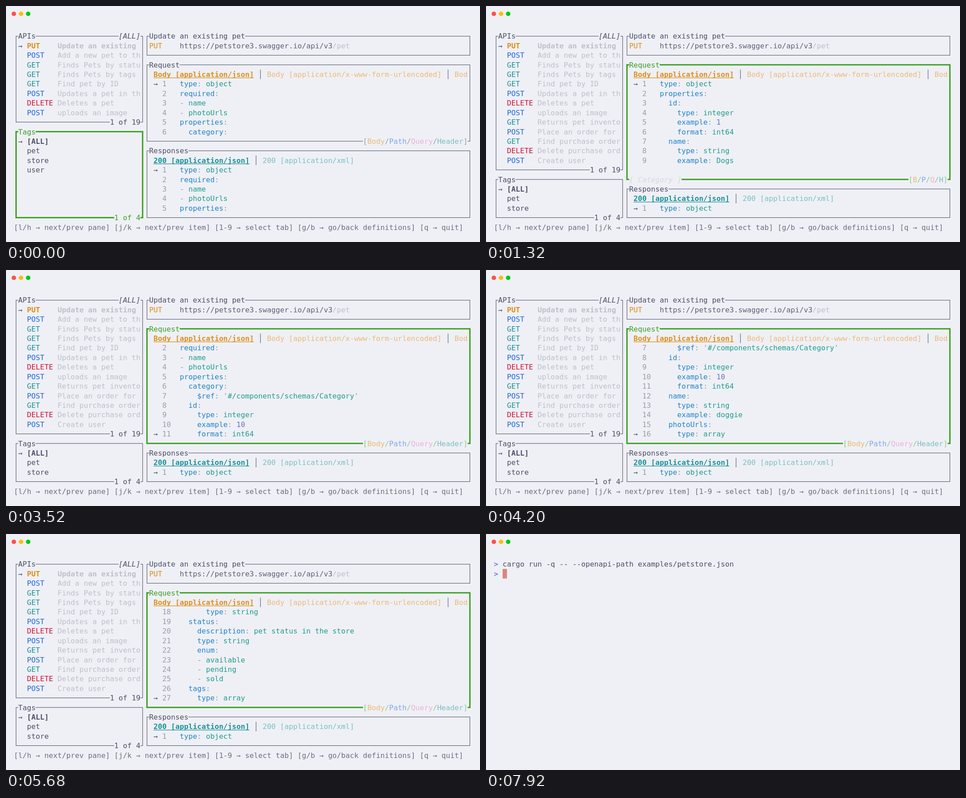
Recreate the animation shown at these times as an HTML page with a canvas. Size 1058x529 px, loop 7960 ms.

```html
<!DOCTYPE html>
<html lang="en">
<head>
<meta charset="utf-8">
<title>OpenAPI terminal browser</title>
<style>
  html, body { margin: 0; width: 100%; height: 100%; overflow: hidden; background: #eff0f5; }
  canvas { display: block; }
</style>
</head>
<body>
<canvas id="stage" width="1058" height="529"></canvas>
<script>
const ctx = document.getElementById('stage').getContext('2d');
const LOOP = 7960;
const CELL_W = 9.74, CELL_H = 21.41, LEFT = 17.6, TOP = 56.9;

const BG = '#eff0f5', DARK = '#4c4f69', BODY = '#5c5f77', MUTED = '#6c6f85', GREY = '#9a9cae',
  PALE = '#bcc0cc', FAINT = '#d6d8e0', GREEN = '#3aa024', LIGHT_GREEN = '#8cc97f',
  YELLOW = '#df8e1d', TEAL = '#179299', LIGHT_YELLOW = '#ebba78', LIGHT_TEAL = '#7ac0c4',
  KEY = '#2083cb', VALUE = '#209d90', NUMBER = '#6c6fc4', PUNCT = '#8c98a2';
const METHOD = { PUT: YELLOW, POST: '#1e66e0', GET: TEAL, DELETE: '#cf1039' };

const apis = [
  'PUT Update an existing pet', 'POST Add a new pet to the store', 'GET Finds Pets by status',
  'GET Finds Pets by tags', 'GET Find pet by ID', 'POST Updates a pet in the store',
  'DELETE Deletes a pet', 'POST uploads an image', 'GET Returns pet inventories',
  'POST Place an order for a pet', 'GET Find purchase order by ID',
  'DELETE Delete purchase order by ID', 'POST Create user'
];
const tags = ['[ALL]', 'pet', 'store', 'user'];

const pet = `type: object
required:
- name
- photoUrls
properties:
  category:
    $ref: '#/components/schemas/Category'
  id:
    type: integer
    example: 10
    format: int64
  name:
    type: string
    example: doggie
  photoUrls:
    type: array
    items:
      type: string
  status:
    description: pet status in the store
    type: string
    enum:
    - available
    - pending
    - sold
  tags:
    type: array
    items:
      $ref: '#/components/schemas/Tag'`.split('\n');
const category = `type: object
properties:
  id:
    type: integer
    example: 1
    format: int64
  name:
    type: string
    example: Dogs`.split('\n');
const tag = category.filter(line => !line.includes('example'));

// Key presses, in ms
const downKeys = [520, 640, 760, 840, 960, 1080, 3240, 3320, 3440, 3520, 3640, 3800, 3960, 4080,
  4200, 4360, 4480, 4640, 4760, 4880, 5040, 5160, 5280, 5400, 5520, 5680, 5800, 5920];
const upKeys = [7360, 7440];
const categoryKeys = [2000, 2120, 2280];
const presses = (keys, t) => keys.filter(k => k <= t).length;

const colX = c => LEFT + c * CELL_W;
const rowY = r => TOP + r * CELL_H;
const midX = c => colX(c + .5);
const midY = r => rowY(r + .5);

// Writes text on the cell grid and returns the next free column
function put(col, row, text, color, style = '') {
  ctx.font = `${style} 16.18px "DejaVu Sans Mono", monospace`;
  ctx.fillStyle = color;
  for (const ch of text) ctx.fillText(ch, colX(col++), midY(row) + 5.8);
  return col;
}

function spans(col, row, list) {
  for (const [text, color, style] of list) col = put(col, row, text, color, style);
}

// Text that interrupts a border
function label(col, row, ...list) {
  const length = list.reduce((n, [text]) => n + text.length, 0);
  ctx.fillStyle = BG;
  ctx.fillRect(colX(col), midY(row) - 4, length * CELL_W, 8);
  spans(col, row, list);
}

function pane(c0, r0, c1, r1, title, focused) {
  ctx.strokeStyle = focused ? GREEN : BODY;
  ctx.lineWidth = focused ? 3 : 1.2;
  ctx.strokeRect(midX(c0), midY(r0), (c1 - c0) * CELL_W, (r1 - r0) * CELL_H);
  label(c0 + 1, r0, [title, focused ? GREEN : DARK]);
}

function divider(col, row) {
  ctx.fillStyle = BODY;
  ctx.fillRect(midX(col) - .6, rowY(row), 1.2, CELL_H);
}

function tabs(row, active, others, color, lightColor) {
  let col = put(32, row, active, color, 'bold');
  ctx.fillRect(colX(32), midY(row) + 7.2, active.length * CELL_W, 1.3);
  for (const name of others) {
    divider(col + 1, row);
    col = put(col + 3, row, name, lightColor);
  }
}

function yaml(row, line) {
  const [, indent, dash = '', key = '', colon = '', value] =
    line.match(/^( *)(- )?(?:(\S+)(: ?))?(.*)$/);
  const parts = value.split(/(')/).map(s =>
    [s, s === "'" ? PUNCT : /^\d+$/.test(s) ? NUMBER : VALUE]);
  spans(38 + indent.length, row, [[dash, PUNCT], [key, KEY], [colon, PUNCT], ...parts]);
}

function code(row, count, lines, cursor = 1, offset = 0) {
  lines.slice(offset, offset + count).forEach((line, i) => {
    const n = offset + i + 1;
    if (n === cursor) put(32, row + i, '→', DARK);
    put(34, row + i, String(n), GREY);
    yaml(row + i, line);
  });
}

function drawLeft(focus) {
  const split = focus === 'tags' ? 9 : 14;
  pane(0, 0, 29, split, 'APIs', false);
  label(24, 0, ['[ALL]', DARK, 'italic']);
  label(22, split, ['1 of 19', DARK]);
  put(1, 1, '→', DARK);
  apis.slice(0, split - 1).forEach((api, i) => {
    const method = api.split(' ')[0], style = i ? '' : 'bold';
    put(3, i + 1, method, METHOD[method], style);
    put(10, i + 1, api.slice(method.length + 1, method.length + 20), PALE, style);
  });

  const focused = focus === 'tags';
  pane(0, split + 1, 29, 19, 'Tags', focused);
  label(23, 19, ['1 of 4', focused ? GREEN : DARK]);
  put(1, split + 2, '→', DARK);
  tags.slice(0, 17 - split).forEach((name, i) =>
    put(3, split + 2 + i, name, DARK, i ? '' : 'bold'));
}

function drawRequest(t, focused, end) {
  pane(30, 3, 104, end, 'Request', focused);
  tabs(4, 'Body [application/json]', ['Body [application/x-www-form-urlencoded]', 'Bod'],
    YELLOW, LIGHT_YELLOW);

  const nested = t >= 1320 && t < 2560 ? 'Category' : t >= 6760 && t < 7240 ? 'Tag' : '';
  const rows = end - 5;
  if (nested === 'Category') code(5, rows, category, 1 + presses(categoryKeys, t));
  else if (nested) code(5, rows, tag);
  else {
    const lowest = 1 + presses(downKeys, t);
    code(5, rows, pet, lowest - presses(upKeys, t), Math.max(0, lowest - rows));
  }

  if (nested) label(31, end, [`[ ${nested} ]`, FAINT, 'italic']);
  const names = ['Body', 'Path', 'Query', 'Header'].map(s => nested ? s[0] : s);
  const colors = [LIGHT_YELLOW, '#7ba6f4', '#ecb0da', LIGHT_TEAL];
  const edge = focused ? LIGHT_GREEN : GREY;
  const list = names.flatMap((s, i) => [[i ? '/' : '[', edge], [s, colors[i]]]);
  label(nested ? 95 : 80, end, ...list, [']', edge]);
}

function drawBrowser(t) {
  const focus = t < 160 ? 'tags' : t < 400 ? 'address' : 'request';
  drawLeft(focus);

  pane(30, 0, 104, 2, 'Update an existing pet', focus === 'address');
  put(31, 1, 'PUT', YELLOW);
  spans(38, 1, [['https://petstore3.swagger.io/api/v3', BODY], ['/pet', PALE]]);

  const end = focus === 'request' ? 15 : 11;
  drawRequest(t, focus === 'request', end);

  pane(30, end + 1, 104, 19, 'Responses', false);
  tabs(end + 2, '200 [application/json]', ['200 [application/xml]'], TEAL, LIGHT_TEAL);
  code(end + 3, 16 - end, pet);

  put(0, 20, '[l/h → next/prev pane] [j/k → next/prev item] [1-9 → select tab] ' +
    '[g/b → go/back definitions] [q → quit]', MUTED);
}

function drawShell(prompted) {
  const prompt = row => put(0, row, '>', '#4460cc');
  prompt(0);
  put(2, 0, 'cargo run -q -- --openapi-path examples/petstore.json', DARK);
  if (prompted) prompt(1);
  ctx.fillStyle = '#da8878';
  ctx.fillRect(colX(prompted ? 2 : 0), rowY(1), CELL_W, CELL_H);
}

function draw(t) {
  ctx.fillStyle = BG;
  ctx.fillRect(0, 0, 1058, 529);
  ['#ff5148', '#fdbc12', '#04c818'].forEach((color, i) => {
    ctx.fillStyle = color;
    ctx.beginPath();
    ctx.arc(17.5 + 16 * i, 17.5, 5, 0, 7);
    ctx.fill();
  });
  if (t < 7880) drawBrowser(t);
  else drawShell(t >= 7920);
}

const start = performance.now();
function tick() {
  draw((performance.now() - start) % LOOP);
  requestAnimationFrame(tick);
}
tick();
</script>
</body>
</html>
```
